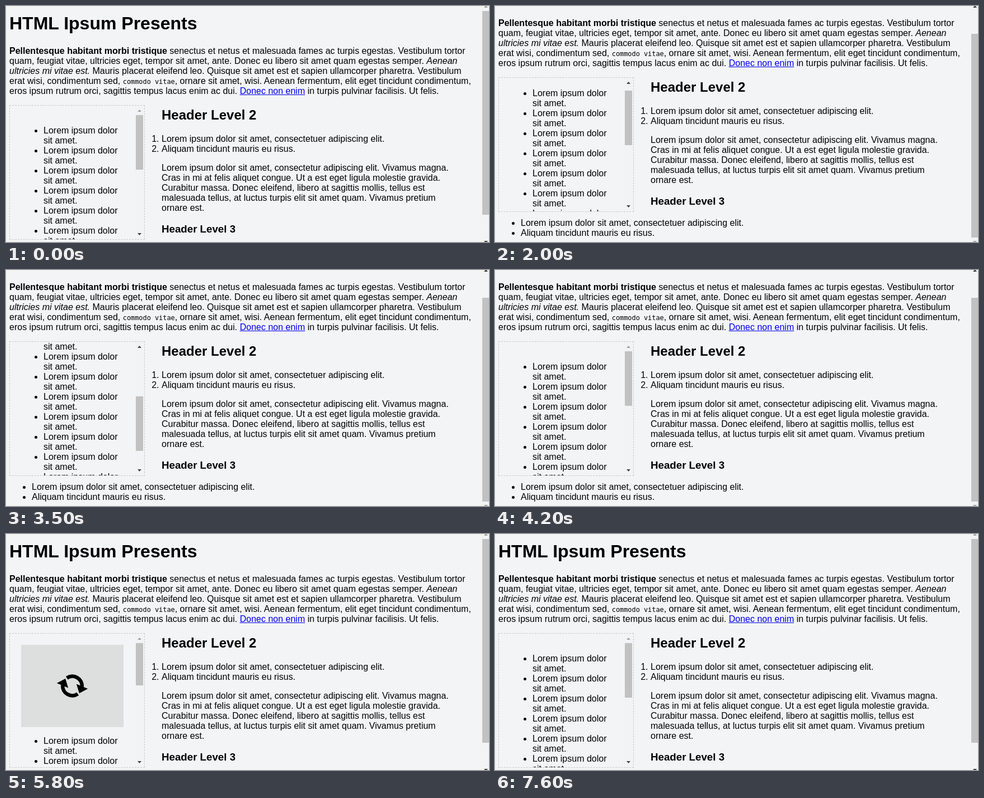
Animation, 863 px wide and 424 px high, one loop 8 s. Source, as an HTML page:

```html
<!DOCTYPE html>
<html lang="en">
<head>
<meta charset="utf-8">
<title>Scrolling page with refreshing list</title>
<style>
  html, body { margin: 0; width: 100%; height: 100%; overflow: hidden; background: #f3f4f6; }
  body { font: 16px/18px "Liberation Sans", Arial, sans-serif; color: #000; }
  #stage { position: relative; width: 863px; height: 424px; overflow: hidden; background: #f3f4f6; }
  #page { position: absolute; left: 0; top: 0; width: 849px; height: 600px; }
  #page > * { position: absolute; margin: 0; white-space: nowrap; }
  h1 { left: 6px; top: 13px; font-size: 32px; line-height: 37px; }
  h2 { left: 278px; top: 182px; font-size: 24px; line-height: 27px; }
  h3 { left: 278px; top: 390px; font-size: 18.72px; line-height: 21px; }
  .intro { left: 6px; top: 72px; }
  .quote { left: 278px; top: 282px; }
  ol { left: 238px; top: 230px; }
  ol, ul { margin: 0; padding: 0 0 0 40px; }
  .tail { left: 6px; top: 431px; }
  code { font: 11.88px/1 "DejaVu Sans Mono", monospace; }
  u { color: #00e; }
  #box { left: 6px; top: 178px; width: 240px; height: 240px; border: 1px dashed #c8c8c8; overflow: hidden; }
  #list { position: absolute; left: 20px; top: 20px; width: 183px; }
  #list ul { margin: 16px 0; }
  #loader { display: block; width: 183px; height: 148px; background: #dddfde; }
  .bar { position: absolute; width: 17px; background: #f2f3f4; }
  .bar i { position: absolute; left: 2px; width: 13px; top: 17px; background: #c1c1c1; }
  .bar svg { position: absolute; left: 0; width: 17px; height: 17px; }
  .bar .up { top: 0; }
  .bar .down { bottom: 0; }
  #pageBar { left: 849px; top: -8px; height: 441px; }
  #listBar { left: 223px; top: 0; height: 240px; }
</style>
</head>
<body>
<div id="stage">
  <div id="page">
    <h1>HTML Ipsum Presents</h1>
    <p class="intro"><b>Pellentesque habitant morbi tristique</b> senectus et netus et malesuada fames ac turpis egestas. Vestibulum tortor<br>
      quam, feugiat vitae, ultricies eget, tempor sit amet, ante. Donec eu libero sit amet quam egestas semper. <em>Aenean<br>
      ultricies mi vitae est.</em> Mauris placerat eleifend leo. Quisque sit amet est et sapien ullamcorper pharetra. Vestibulum<br>
      erat wisi, condimentum sed, <code>commodo vitae</code>, ornare sit amet, wisi. Aenean fermentum, elit eget tincidunt condimentum,<br>
      eros ipsum rutrum orci, sagittis tempus lacus enim ac dui. <u>Donec non enim</u> in turpis pulvinar facilisis. Ut felis.</p>
    <div id="box">
      <div id="list">
        <svg id="loader" viewBox="0 0 183 148">
          <g id="icon">
            <g id="arrow">
              <path d="M-14.5 -9.5A17.3 17.3 0 0 1 16.5 -5.2" fill="none" stroke="#000" stroke-width="6.6"/>
              <path d="M5.5 -6H27.5L16.5 7.5Z"/>
            </g>
            <use href="#arrow" transform="rotate(180)"/>
          </g>
        </svg>
        <ul id="items"></ul>
      </div>
      <div class="bar" id="listBar"></div>
    </div>
    <h2>Header Level 2</h2>
    <ol>
      <li>Lorem ipsum dolor sit amet, consectetuer adipiscing elit.</li>
      <li>Aliquam tincidunt mauris eu risus.</li>
    </ol>
    <p class="quote">Lorem ipsum dolor sit amet, consectetur adipiscing elit. Vivamus magna.<br>
      Cras in mi at felis aliquet congue. Ut a est eget ligula molestie gravida.<br>
      Curabitur massa. Donec eleifend, libero at sagittis mollis, tellus est<br>
      malesuada tellus, at luctus turpis elit sit amet quam. Vivamus pretium<br>
      ornare est.</p>
    <h3>Header Level 3</h3>
    <ul class="tail">
      <li>Lorem ipsum dolor sit amet, consectetuer adipiscing elit.</li>
      <li>Aliquam tincidunt mauris eu risus.</li>
    </ul>
  </div>
  <div class="bar" id="pageBar"></div>
</div>
<script>
  const LOOP = 8000, TICK = 100;
  const SPIN_FROM = 4600, SPIN_TO = 7600, DEG_PER_MS = 405 / 2000;

  // [time, scroll offset], held until the next entry
  const pageSteps = [[0, 0], [1000, 7], [1100, 36], [1200, 50], [4600, 43], [4700, 13], [4800, 0]];
  const listSteps = [[0, 0], [2000, 17], [2100, 78], [2200, 100], [2500, 117], [2600, 178], [2700, 200],
    [3500, 198], [3600, 135], [3700, 100], [4000, 83], [4100, 22], [4200, 0]];

  const $ = id => document.getElementById(id);
  const valueAt = (steps, t) => steps.filter(s => s[0] <= t).pop()[1];

  $('items').innerHTML = '<li>Lorem ipsum dolor<br>sit amet.</li>'.repeat(12);

  function makeBar(el, length) {
    el.innerHTML = '<svg class="up"><path d="M5 11L8.5 7L12 11Z"/></svg><i></i>' +
      '<svg class="down"><path d="M5 6L8.5 10L12 6Z"/></svg>';
    const [up, down] = el.querySelectorAll('path');
    const thumb = el.querySelector('i');
    const shade = on => on ? '#404040' : '#a3a3a3';
    return (pos, max, size, hover) => {
      const room = length - 34 - size;
      thumb.style.height = size + 'px';
      thumb.style.transform = `translateY(${Math.floor(pos / max * room)}px)`;
      thumb.style.background = hover ? '#a8a8a8' : '#c1c1c1';
      up.setAttribute('fill', shade(pos > 0));
      down.setAttribute('fill', shade(pos < max));
    };
  }
  const setPageBar = makeBar($('pageBar'), 441);
  const setListBar = makeBar($('listBar'), 240);

  function draw(t) {
    const page = valueAt(pageSteps, t), list = valueAt(listSteps, t);
    const loading = t >= SPIN_FROM && t < SPIN_TO;
    $('page').style.transform = `translateY(${-page}px)`;
    $('list').style.transform = `translateY(${-list}px)`;
    setPageBar(page, 50, 366, t >= 100 && t < 200);
    setListBar(list, loading ? 412 : 264, loading ? 76 : 98, false);
    $('loader').style.display = loading ? 'block' : 'none';
    const angle = (Math.floor(t / TICK) * TICK - 4800) * DEG_PER_MS;
    $('icon').setAttribute('transform', `translate(91.5 74) rotate(${angle})`);
  }

  const start = performance.now();
  function frame() {
    draw((performance.now() - start) % LOOP);
    requestAnimationFrame(frame);
  }
  frame();
</script>
</body>
</html>
```
